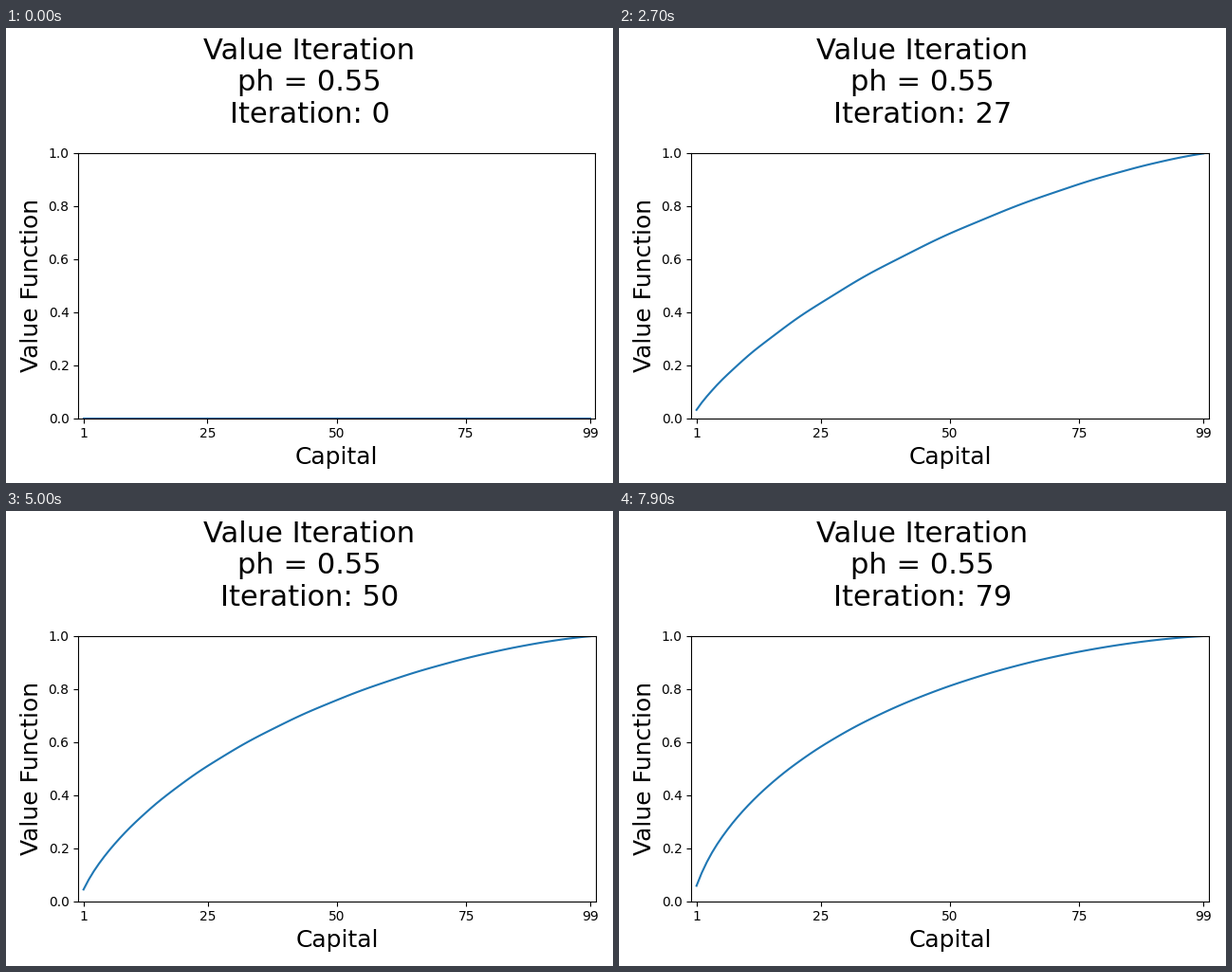
These frames come from a looping animation (640 by 480 pixels, 8 s). A matplotlib script:

```python
import numpy as np
import matplotlib.pyplot as plt
from matplotlib.animation import FuncAnimation

GOAL = 100
PH = 0.55
STEPS = 80


def sweep(v):
    """One synchronous Bellman backup of the gambler's problem."""
    new = v.copy()
    for s in range(1, GOAL):
        bet = np.arange(1, min(s, GOAL - s) + 1)
        new[s] = np.max(PH * v[s + bet] + (1 - PH) * v[s - bet])
    return new


def heading(k):
    return f"Value Iteration\nph = {PH}\nIteration: {k}"


values = [np.zeros(GOAL + 1)]
values[0][GOAL] = 1
for _ in range(STEPS - 1):
    values.append(sweep(values[-1]))

plt.rcParams["font.family"] = "DejaVu Sans"
fig, ax = plt.subplots(figsize=(6.4, 4.8), dpi=100)
states = np.arange(1, GOAL)
line, = ax.plot(states, values[0][1:GOAL])
ax.set(xlim=(0, GOAL), ylim=(0, 1), xticks=[1, 25, 50, 75, 99])
ax.set_xlabel("Capital", fontsize=18)
ax.set_ylabel("Value Function", fontsize=18)
title = fig.suptitle(heading(0), fontsize=22)

# The layout settles on the second pass; the opening view uses the first.
fig.tight_layout()
first_box = ax.get_position().frozen()
fig.tight_layout()
settled_box = ax.get_position().frozen()


def draw(k):
    ax.set_position(settled_box if k else first_box)
    line.set_ydata(values[k][1:GOAL])
    title.set_text(heading(k))
    return line, title


anim = FuncAnimation(fig, draw, frames=STEPS, interval=100,
                     repeat=True, repeat_delay=0, blit=False)
plt.show()
```
